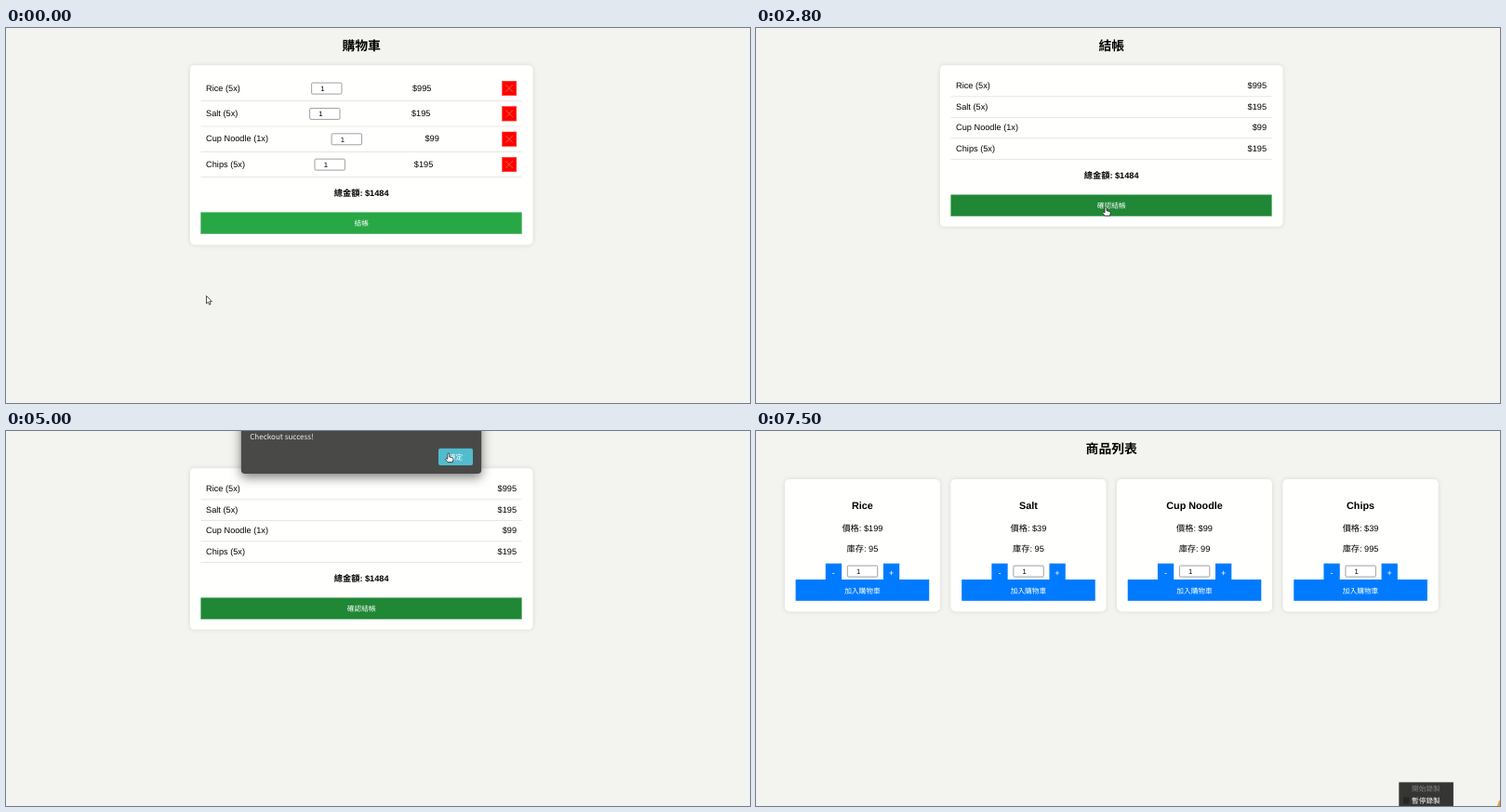
An HTML page for the animation above (8.3 s loop, 800 by 404 pixels).

```html
<!DOCTYPE html>
<html lang="zh-Hant">
<head>
<meta charset="utf-8">
<title>購物車</title>
<style>
  html, body { margin: 0; width: 100%; height: 100%; overflow: hidden; background: #f3f3ef; }
  svg { display: block; width: 100vw; height: 100vh; }
  text { font-family: "Liberation Sans", "Noto Sans CJK TC", "Noto Sans CJK", sans-serif; text-rendering: geometricPrecision; white-space: pre; }
  .ui { font-family: "Noto Sans CJK TC", "Noto Sans CJK", "Noto Sans", sans-serif; }
</style>
</head>
<body>
<svg id="stage" viewBox="0 0 800 404">
  <defs>
    <filter id="soft" x="-10%" y="-10%" width="120%" height="120%">
      <feDropShadow dx="0" dy="0" stdDeviation="2.4" flood-opacity=".12"/>
    </filter>
    <filter id="deep" x="-20%" y="-60%" width="140%" height="240%">
      <feDropShadow dx="0" dy="4" stdDeviation="6" flood-opacity=".5"/>
    </filter>
  </defs>
  <rect width="800" height="404" fill="#f3f3ef"/>
  <g id="cart"></g>
  <g id="checkout"></g>
  <g id="shop"></g>
  <g id="dialog"></g>
  <g id="arrow"><path d="M0 0V8.3L1.9 6.6 3.2 9.5 4.6 8.9 3.3 6.1H5.9Z" fill="#fff" stroke="#222" stroke-width=".8" stroke-linejoin="round"/></g>
  <g id="hand"><path d="M-1 .9A1 1 0 0 1 1 .9V3.8L4.1 4.5Q5.4 4.9 5.2 6.4L4.5 9.4H-.8L-3.4 6.2Q-3.4 4.6-1 6Z" fill="#fff" stroke="#222" stroke-width=".8" stroke-linejoin="round"/></g>
  <g id="menu"></g>
</svg>
<script>
const LOOP = 8300, STEP = 100, MID = 382.2;
const GREEN = '#28a745', GREEN_HOVER = '#1f8735', BLUE = '#007bff';
const $ = id => document.getElementById(id);

const rect = (x, y, w, h, fill, extra = '') =>
  `<rect x="${x}" y="${y}" width="${w}" height="${h}" fill="${fill}" ${extra}/>`;
const text = (x, y, s, { size = 9.2, anchor = 'start', fill = '#000', bold = false, cls = '' } = {}) =>
  `<text x="${x}" y="${y}" font-size="${size}" text-anchor="${anchor}" fill="${fill}" class="${cls}"${bold ? ' font-weight="700"' : ''}>${s}</text>`;
const mid = (x, y, s, o = {}) => text(x, y, s, { anchor: 'middle', ...o });
const card = (x, y, w, h) => rect(x, y, w, h, '#fffffd', 'rx="4.8" filter="url(#soft)"');
const title = s => mid(MID, 24.2, s, { size: 13.8, bold: true });
const line = y => rect(209.5, y, 345, .7, '#dcdcd8');
const field = (x, y) =>
  rect(x, y, 32.4, 12, '#fff', 'rx="1.2" stroke="#777" stroke-width=".7"') + mid(x + 11.8, y + 8.7, '1', { size: 7.7 });
const payButton = (id, y, s) =>
  rect(209.7, y, 344.7, 22.9, GREEN, `id="${id}" stroke="#53ad68" stroke-width=".6"`) +
  mid(MID, y + 14.4, s, { size: 7.7, fill: '#fff' });
const total = y => mid(MID, y, '總金額: $1484', { bold: true });

const items = [
  { name: 'Rice', qty: 5, sum: 995, price: 199, stock: 95, fieldX: 328.6, sumX: 437 },
  { name: 'Salt', qty: 5, sum: 195, price: 39, stock: 95, fieldX: 326.6, sumX: 436 },
  { name: 'Cup Noodle', qty: 1, sum: 99, price: 99, stock: 99, fieldX: 350.1, sumX: 450.5 },
  { name: 'Chips', qty: 5, sum: 195, price: 39, stock: 995, fieldX: 332, sumX: 438.8 }
];
const label = i => `${i.name} (${i.qty}x)`;

function cartRow(item, n) {
  const y = 64.8 + n * 27.35;
  return text(215.1, y + 2.9, label(item)) +
    field(item.fieldX, y - 5.7) +
    text(item.sumX, y + 2.9, '$' + item.sum) +
    rect(533.6, y - 7.5, 15.2, 15.4, '#f00', 'stroke="#ff3a2c" stroke-width=".6"') +
    `<path d="M537.4 ${y - 3.6}l7.6 7.6m0 -7.6l-7.6 7.6" stroke="#d8683c" stroke-width="1"/>` +
    line(y + 13.5);
}

function checkoutRow(item, n) {
  const y = 65.3 + n * 22.5;
  return text(215.1, y, label(item)) + text(549, y, '$' + item.sum, { anchor: 'end' }) + line(y + 8.2);
}

function product(item, n) {
  const x = 31 + n * 178.55, c = x + 83.4;
  const key = (dx, s) => rect(x + dx, 142.7, 17.3, 17.5, BLUE) + mid(x + dx + 8.6, 156.2, s, { fill: '#fff' });
  return card(x, 52, 166.8, 142.2) +
    mid(c, 83.9, item.name, { size: 10.77, bold: true }) +
    mid(c, 107.8, '價格: $' + item.price) +
    mid(c, 130.4, '庫存: ' + item.stock) +
    key(43.8, '-') + field(x + 67.3, 145.1) + key(105.9, '+') +
    rect(x + 11.6, 160, 143.6, 22.9, BLUE) +
    mid(c, 174.5, '加入購物車', { size: 7.7, fill: '#fff' });
}

$('cart').innerHTML = title('購物車') + card(198, 40.2, 368.4, 193.2) +
  items.map(cartRow).join('') + total(181) + payButton('toCheckout', 198.8, '結帳');
$('checkout').innerHTML = title('結帳') + card(198, 40.2, 368.4, 173.6) +
  items.map(checkoutRow).join('') + total(162) + payButton('confirm', 179.8, '確認結帳');
$('shop').innerHTML = title('商品列表') + items.map(product).join('') +
  '<circle cx="811" cy="406" r="14" fill="#e9a033"/>';
$('dialog').innerHTML = rect(252.8, -30, 258.4, 76, '#4a4a46', 'rx="4" filter="url(#deep)"') +
  text(262.2, 8.5, 'Checkout success!', { size: 8.05, fill: '#ecece8', cls: 'ui' }) +
  rect(465, 18.8, 37, 18.2, '#19b0c8', 'id="ok" rx="2"') +
  mid(483.4, 30.9, '確定', { size: 7.7, fill: '#fff', cls: 'ui' });
$('menu').innerHTML = rect(691.3, 378.4, 58.6, 25.6, '#353533') +
  rect(696, 394.5, 6.5, 7, '#262624') +
  mid(720.4, 388.1, '開始錄製', { size: 7.7, fill: '#80807c', cls: 'ui' }) +
  mid(720.4, 401.1, '暫停錄製', { size: 7.7, fill: '#fff', cls: 'ui' });

// pointer stops: time, x, y
const stops = [
  [0, 215.5, 288.6], [400, 243, 150], [700, 247, 217.4], [900, 247, 217.4], [1000, 247.6, 218],
  [1200, 247.6, 218], [1900, 290, 292.6], [2200, 290, 292.6], [2800, 376, 193],
  [4000, 376, 193], [4900, 475.8, 24.2], [5100, 475.8, 24.2], [5800, 429.2, 255.5],
  [6400, 429.2, 255.5], [6800, 699.6, 381.8], [LOOP, 699.6, 381.8]
];

function pointerAt(t) {
  const i = stops.findIndex(s => s[0] > t);
  const [t0, x0, y0] = stops[i - 1], [t1, x1, y1] = stops[i];
  const p = (t - t0) / (t1 - t0), e = p * p * (3 - 2 * p);
  return [x0 + (x1 - x0) * e, y0 + (y1 - y0) * e];
}

function dialogOpacity(t) {
  if (t < 3500 || t >= 5200) return 0;
  if (t >= 5100) return .5;
  return Math.min(1, .35 + (t - 3500) / 300);
}

const show = (id, on) => $(id).setAttribute('display', on ? 'inline' : 'none');
const fill = (id, color) => $(id).setAttribute('fill', color);

function draw(ms) {
  const t = Math.floor(ms % LOOP / STEP) * STEP;
  const [x, y] = pointerAt(t);
  const page = t < 1200 ? 'cart' : t < 5200 ? 'checkout' : 'shop';
  for (const id of ['cart', 'checkout', 'shop']) show(id, id === page);

  const modal = dialogOpacity(t);
  const within = (l, top, r, b) => x > l && x < r && y > top && y < b;
  const onCart = page === 'cart' && within(209, 198, 555, 222);
  const onConfirm = page === 'checkout' && within(209, 180, 555, 203);
  const onOk = modal > 0 && within(465, 19, 502, 37);

  fill('toCheckout', onCart ? GREEN_HOVER : GREEN);
  fill('confirm', onConfirm || modal > 0 ? GREEN_HOVER : GREEN);
  fill('ok', onOk ? '#52bccf' : '#19b0c8');
  show('dialog', modal > 0);
  $('dialog').setAttribute('opacity', modal);

  const hand = onOk || onCart || onConfirm;
  show('hand', hand);
  show('arrow', !hand);
  $(hand ? 'hand' : 'arrow').setAttribute('transform', `translate(${x} ${y})`);
  show('menu', t >= 7500);
}

const start = performance.now();
function tick() {
  draw(performance.now() - start);
  requestAnimationFrame(tick);
}
tick();
</script>
</body>
</html>
```
